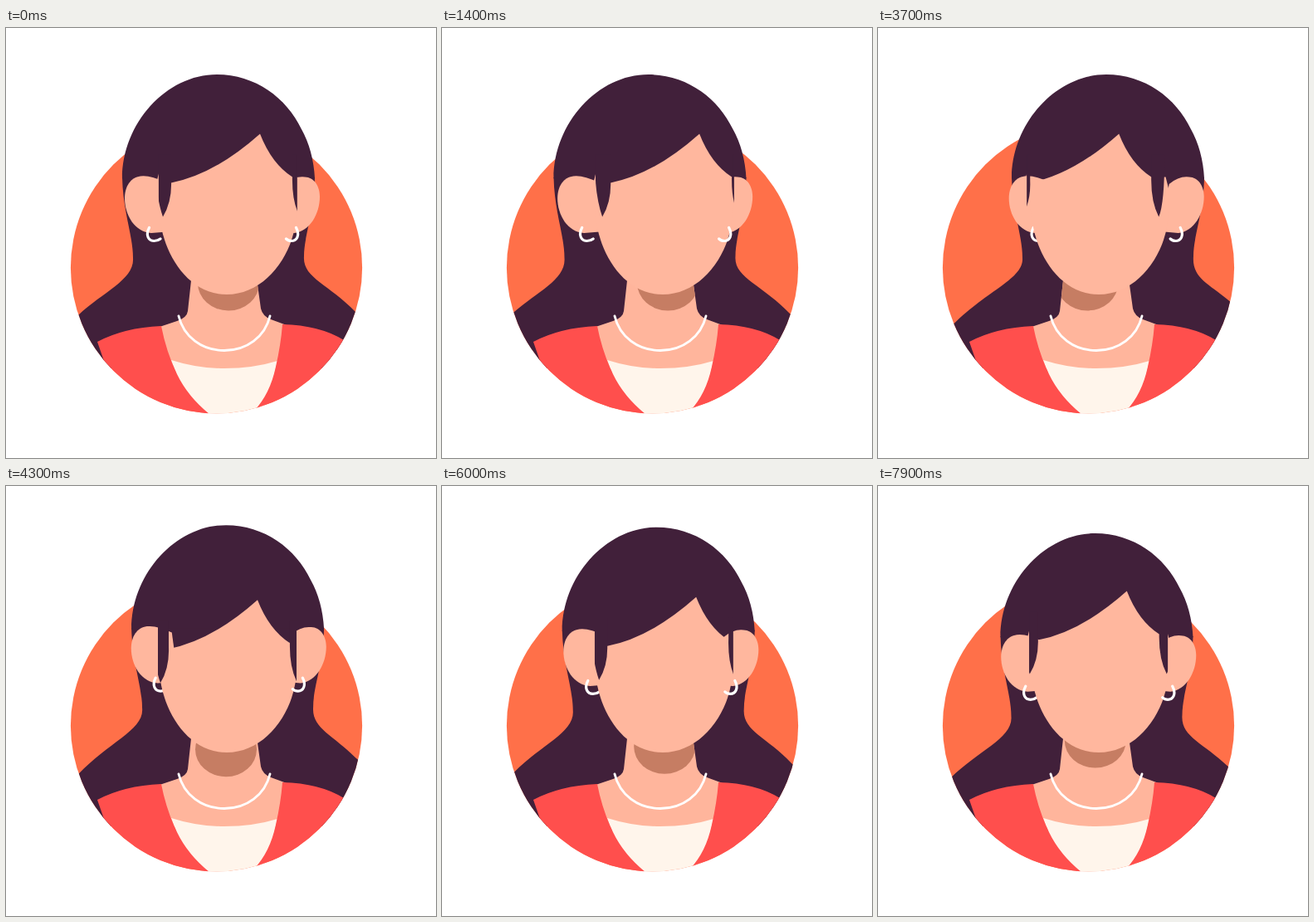
An HTML page that plays this animation: 518 px wide and 518 px high, repeating every 8 s.

```html
<!DOCTYPE html>
<html lang="en">
<head>
<meta charset="utf-8">
<title>Portrait</title>
<style>
html, body { margin: 0; width: 100%; height: 100%; overflow: hidden; background: #fff; }
svg { display: block; width: 100vw; height: 100vh; }
</style>
</head>
<body>
<svg viewBox="0 0 518 518">
  <defs>
    <clipPath id="disc"><circle cx="253.5" cy="288.7" r="175.6"/></clipPath>
    <clipPath id="bust"><path d="M0 0H518V288.700H429.1A175.600 175.600 0 0 1 77.9 288.700H0Z"/></clipPath>
    <clipPath id="neckClip"><path id="neckShape" d="M224 295L219 341Q218 349 206 353L185 360L196 412H330L338 358L319 351Q309 347 307 338L301 295Z"/></clipPath>
    <clipPath id="templeClip"><rect id="temples" y="0" height="300"/></clipPath>
  </defs>
  <circle cx="253.5" cy="288.7" r="175.6" fill="#ff7049"/>
  <g clip-path="url(#bust)" fill="#41203a">
    <path id="crown" d="M140 181C140 115 193 56 254 56C300 56 338 84 356 122Q370 147 372 181L300 240H200Z"/>
    <path id="locks"/>
  </g>
  <g clip-path="url(#disc)">
    <use href="#neckShape" fill="#ffb59c"/>
    <g clip-path="url(#neckClip)"><ellipse id="shade" rx="37" ry="33" fill="#c67d63"/></g>
    <path d="M199 400Q230 410 263 410Q298 410 327 401L318 440L304 470H240L214 440Z" fill="#fff5eb"/>
    <g fill="#ff4f4d">
      <path d="M110 378Q142 361 187 359Q193 390 206 417Q219 444 245 465V480H130L118 401Z"/>
      <path d="M333 357Q378 358 407 376L440 390V480H294L299 461Q318 441 325 408Q331 382 333 357Z"/>
    </g>
    <path d="M208 347C214 372 236 388.500 263 388.500S312 372 318 347" fill="none" stroke="#fff" stroke-width="2.900" stroke-linecap="round"/>
  </g>
  <g id="ears">
    <g fill="#ffb79e">
      <path d="M192 186Q174 177 162 178.500C150 180 143 191 143 205C143 225 155 246 175 247L200 245Z"/>
      <path d="M336 188Q348 178 360 179.500C371 180 378 190 378 203C378 224 366 245 347 247L325 245Z"/>
    </g>
    <path class="ring" d="M172.500 240.500C167.500 250 172 256.500 178.500 256.500Q183 256.500 186 254"/>
  </g>
  <path id="face" fill="#ffb79e"/>
  <g clip-path="url(#templeClip)"><path id="burns" fill="#41203a"/></g>
  <g id="ringR"><path class="ring" d="M349.500 240.500C354.500 250 350 256.500 344 256.500Q340 256.500 337.500 254"/></g>
</svg>
<style>.ring { fill: none; stroke: #fff; stroke-width: 3.2; stroke-linecap: round; }</style>
<script>
const LOOP = 8000, STEP = 100;

// Key points of the head's path: time, x, y
const path = [
  [0, 0, 0],
  [1400, -5.5, 0],
  [2400, 8, -10],
  [3700, 21, 0],
  [4500, 8, -10.5],
  [5100, 4, -10],
  [5700, 3.5, -9.5],
  [6900, 11.5, 10],
  [7900, 7.5, 1]
];
const count = path.length;
const key = i => path[(i + count) % count];
const gap = i => (key(i + 1)[0] - key(i)[0] + LOOP) % LOOP;
const rate = (i, c) => (key(i + 1)[c] - key(i)[c]) / gap(i);

// Slope that never overshoots a key point
function slope(i, c) {
  const a = rate(i - 1, c), b = rate(i, c);
  return a * b <= 0 ? 0 : 2 * a * b / (a + b);
}

function headAt(t) {
  const i = path.findLastIndex(p => p[0] <= t);
  const h = gap(i), u = (t - path[i][0]) / h, v = 1 - u;
  return [1, 2].map(c =>
    v * v * (1 + 2 * u) * key(i)[c] + u * u * (3 - 2 * u) * key(i + 1)[c] +
    h * u * v * (v * slope(i, c) - u * slope(i + 1, c)));
}

function set(id, attrs) {
  const node = document.getElementById(id);
  for (const name in attrs) node.setAttribute(name, attrs[name]);
}

function draw(t) {
  const [x, y] = headAt(t);
  const shift = (dx, dy) => `translate(${dx} ${dy})`;

  // The parting turns against the skull
  const px = 306 - 0.75 * x - 0.6 * y;
  const py = 127.4 - 0.85 * y + 0.03 * y * y;
  const turn = px - 303;
  const left = 183 + 0.3 * turn, right = 350 + 0.27 * turn;
  const endL = 346 + 0.72 * x + 0.75 * y, endR = 342 - 0.72 * x + 0.75 * y;
  const ears = shift(0.7 * x, 0.95 * (127.4 - py));

  set('crown', { transform: shift(x, y) });
  set('locks', { d: `M${140 + x} ${180 + y}
    C${141 + x} ${222 + y} ${153 + x} ${250 + y} ${153 + x} ${277 + y}
    C${155 + x} ${303 + y} ${118 + x / 2} ${317 + y} 87 ${endL}
    L60 ${endL + 20} V410 H450 V${endR + 24} L421 ${endR}
    C${388 + x / 2} ${308 + y} ${357 + x} ${301 + y} ${359 + x} ${275 + y}
    C${359 + x} ${250 + y} ${371 + x} ${225 + y} ${372 + x} ${180 + y}Z` });
  set('shade', { cx: px - 38, cy: py + 180 });
  set('ears', { transform: ears });
  set('ringR', { transform: ears });
  set('face', { d: `M${left - 4} ${py + 64} L${left} ${py + 48} V${py + 58} L${px - 107} ${py + 59}
    Q${px - 55} ${py + 49} ${px} ${py}
    Q${px + 14} ${py + 36} ${px + 39} ${py + 52} H${right} L${right + 4} ${py + 68}
    L350 220 C350 268 315 321 266 321 C217 321 188 268 185 225Z` });
  set('temples', { x: left, width: right - left });
  set('burns', { d: `M${px - 126} ${py + 25} H${px - 107} V${py + 57}
    Q${px - 106} ${py + 82} ${px - 117} ${py + 100} Q${px - 124} ${py + 80} ${px - 126} ${py + 48}Z
    M${px + 39} ${py + 25} V${py + 50} Q${px + 38} ${py + 81} ${px + 48} ${py + 100}
    Q${px + 55} ${py + 84} ${px + 55} ${py + 25}Z` });
}

function tick() {
  draw(Math.floor(performance.now() % LOOP / STEP) * STEP);
  requestAnimationFrame(tick);
}
tick();
</script>
</body>
</html>
```
